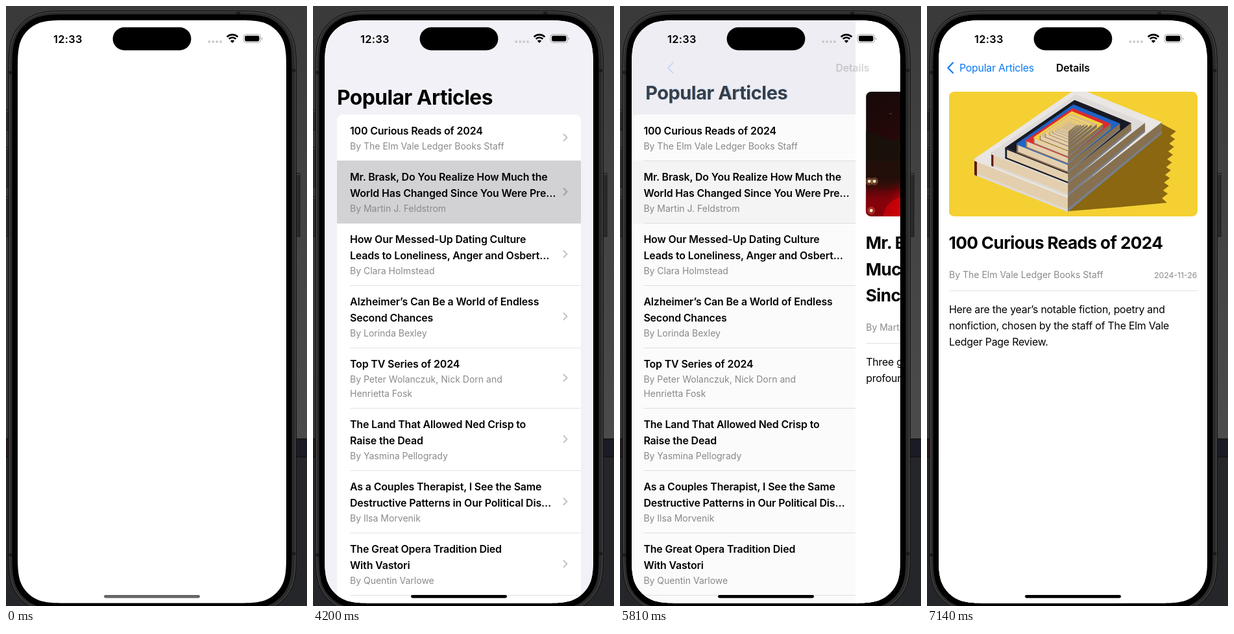
Recreate the animation shown at these times as an HTML page. Size 464x924 px, loop 8000 ms.

```html
<!DOCTYPE html>
<html lang="en">
<head>
<meta charset="utf-8">
<title>Popular Articles</title>
<style>
html, body { margin: 0; width: 100%; height: 100%; overflow: hidden; background: #2a2a2c; }
svg { display: block; width: 464px; height: 924px; }
text { font-family: Inter, "Liberation Sans", Arial, sans-serif; font-optical-sizing: none; white-space: pre; }
.large { font-size: 31.7px; font-weight: 700; letter-spacing: -.016em; }
.head { font-size: 26.2px; font-weight: 700; letter-spacing: -.024em; }
.row { font-size: 15.9px; font-weight: 600; letter-spacing: -.008em; }
.body { font-size: 15.9px; letter-spacing: -.015em; }
.by { font-size: 14px; fill: #8a8a8e; }
.date { font-size: 12.3px; fill: #8a8a8e; text-anchor: end; }
.clock { font-size: 16.4px; font-weight: 600; letter-spacing: .02em; }
.blue { fill: #0a7af5; }
</style>
</head>
<body>
<script>
const LOOP = 8000, TICK = 70, WIDTH = 414;

// ---- drawing helpers ----
const text = (cls, x, y, s) => `<text class="${cls}" x="${x}" y="${y}">${s}</text>`;
const rect = (x, y, w, h, fill, more = '') =>
  `<rect x="${x}" y="${y}" width="${w}" height="${h}" fill="${fill}" ${more}/>`;
const circle = (x, y, r, fill, more = '') => `<circle cx="${x}" cy="${y}" r="${r}" fill="${fill}" ${more}/>`;
const poly = (pts, fill, more = '') => `<polygon points="${pts.join(' ')}" fill="${fill}" ${more}/>`;
const group = (id, inner, more = '') => `<g id="${id}" ${more}>${inner}</g>`;
const range = n => [...Array(n).keys()];

// Rectangle with continuous-curvature corners
function smoothRect(x0, y0, x1, y1, r) {
  const curve = [[1.0885, 0], [.8684, 0], [.6315, .0749], [.3728, .1691], [.1691, .3728],
    [.0749, .6315], [0, .8684], [0, 1.0885], [0, 1.5287]];
  const corner = (cx, cy, sx, sy, swap) => {
    const at = ([a, b]) => {
      if (swap) [a, b] = [b, a];
      return (cx + sx * a * r).toFixed(2) + ' ' + (cy + sy * b * r).toFixed(2);
    };
    return 'L' + at([1.5287, 0]) + 'C' + curve.map(at).join(' ');
  };
  return ('M' + corner(x1, y0, -1, 1).slice(1) + corner(x1, y1, -1, -1, true) +
    corner(x0, y1, 1, -1) + corner(x0, y0, 1, 1, true) + 'Z');
}

// ---- content ----
const rows = [
  { top: 167, title: ['100 Curious Reads of 2024'], by: ['By The Elm Vale Ledger Books Staff'] },
  { top: 238, title: ['Mr. Brask, Do You Realize How Much the', 'World Has Changed Since You Were Pre…'], by: ['By Martin J. Feldstrom'] },
  { top: 334, title: ['How Our Messed-Up Dating Culture', 'Leads to Loneliness, Anger and Osbert…'], by: ['By Clara Holmstead'] },
  { top: 430, title: ['Alzheimer’s Can Be a World of Endless', 'Second Chances'], by: ['By Lorinda Bexley'] },
  { top: 526, title: ['Top TV Series of 2024'], by: ['By Peter Wolanczuk, Nick Dorn and', 'Henrietta Fosk'] },
  { top: 619, title: ['The Land That Allowed Ned Crisp to', 'Raise the Dead'], by: ['By Yasmina Pellogrady'] },
  { top: 715, title: ['As a Couples Therapist, I See the Same', 'Destructive Patterns in Our Political Dis…'], by: ['By Ilsa Morvenik'] },
  { top: 811, title: ['The Great Opera Tradition Died', 'With Vastori'], by: ['By Quentin Varlowe'] },
  { top: 907 }
];
const articles = [
  { head: ['100 Curious Reads of 2024'], by: rows[0].by[0], photo: booksPhoto,
    body: ['Here are the year’s notable fiction, poetry and', 'nonfiction, chosen by the staff of The Elm Vale', 'Ledger Page Review.'] },
  { head: ['Mr. Brask, Do You Realize How', 'Much the World Has Changed', 'Since You Were President?'], by: rows[1].by[0], photo: nightPhoto,
    body: ['Three giant, shifting tectonic plates will have', 'profound implications for the new administration.'] }
];

// ---- list page ----
const cardPath = 'M37 930V176.5a9.5 9.5 0 0 1 9.5-9.5h357a9.5 9.5 0 0 1 9.5 9.5V930Z';

function rowMarkup(row, i) {
  const next = rows[i + 1];
  if (!next) return '';
  const mid = (row.top + next.top) / 2;
  const byTop = row.top + 29 + 25 * row.title.length;
  return row.title.map((s, k) => text('row', 57, row.top + 30.5 + 25 * k, s)).join('') +
    row.by.map((s, k) => text('by', 57, byTop + 22 * k, s)).join('') +
    `<path d="M386.5 ${mid - 5}l5 5l-5 5" fill="none" stroke="#000" stroke-opacity=".24" stroke-width="2" stroke-linecap="round" stroke-linejoin="round"/>`;
}
function listMarkup() {
  const lines = rows.slice(1).map(r => rect(57, r.top, 356, 1, '#e2e2e5')).join('');
  const lit = [0, 1].map(i =>
    rect(37, rows[i].top, 376, rows[i + 1].top - rows[i].top + 1, '#d2d2d5', `id="lit${i}" clip-path="url(#card)"`)).join('');
  return rect(18, 22, WIDTH, 900, '#f2f1f7') + `<path d="${cardPath}" fill="#fff"/>` +
    lines + lit + rows.map(rowMarkup).join('');
}

// ---- detail page ----
function detailMarkup(a, i) {
  const base = 374 + 40.5 * (a.head.length - 1);
  return group('page' + i,
    `<g clip-path="url(#photo)"><g transform="translate(34 132)">${a.photo()}</g></g>` +
    a.head.map((s, k) => text('head', 33.5, 374 + 40.5 * k, s)).join('') +
    text('by', 34, base + 44.5, a.by) + text('date', 416.5, base + 44.5, '2024-11-26') +
    rect(34, base + 64, 383, 1, '#e2e2e5') +
    a.body.map((s, k) => text('body', 34, base + 98.5 + 25 * k, s)).join(''));
}

function nightPhoto() {
  const glow = (x, y, r, a, more = '') => circle(x, y, r, '#ea0509', `opacity="${a}" ${more}`);
  const blur = 'filter="url(#soft)"';
  const lamp = (x, y) => circle(x, y, 6, '#d9a070', 'opacity=".3"') + circle(x, y, 2.4, '#ffe9c4');
  const windows = range(22).map(k =>
    rect(36 + (k * 37 % 75), 33 + (k % 4) * 8, 4, 1.6, '#a98a3e', `opacity="${.35 + k % 3 * .2}"`)).join('');
  const columns = range(9).map(k => rect(132 + k * 11, 66, 4, 34, '#4c3b1c')).join('');
  return rect(0, 0, 383, 192, 'url(#night)') + windows +
    poly(['0,60', '40,75', '90,72', '130,90', '130,150', '0,150'], '#17120b', 'opacity=".8"') +
    rect(180.3, 0, 1.4, 48, '#b5a288') + poly(['155,53', '181,47', '207,53'], '#6d5c34') +
    rect(127, 57, 98, 48, '#a8924c') + rect(126, 55, 100, 3, '#cdb877') + columns +
    rect(124, 102, 106, 4, '#d8c174') + rect(0, 107, 383, 40, '#25100a', 'opacity=".8"') +
    poly(['90,192', '190,140', '226,84', '270,62', '383,-10', '383,115', '300,152', '260,200'], '#e00509', 'opacity=".8" ' + blur) +
    rect(-20, 152, 420, 60, '#b5060a', 'opacity=".65" ' + blur) +
    glow(100, 185, 52, .9, blur) + glow(100, 192, 50, .75) + glow(60, 196, 34, .5) +
    glow(215, 142, 28, .4) + glow(245, 95, 34, .3) + glow(250, 130, 38, .35) +
    glow(315, 77, 33, .95) + glow(260, 72, 24, .4) +
    poly(['184,117', '188,140', '180,140'], '#fff0dc') + rect(260, 40, 18, 4, '#d9a5a5') +
    [[5, 138], [13, 138], [331, 127], [372, 135], [376, 149], [63, 152], [8, 183], [373, 182]].map(p => lamp(...p)).join('');
}

function booksPhoto() {
  const covers = ['#e9e6e3', '#dedbd8', '#171a24', '#1f63c8', '#dc2a30', '#f3d23a'];
  const teeth = range(9).flatMap(k => [`${350 - k * 1.6},${61 + k * 12}`, `${341 - k * 1.6},${68 + k * 12}`]);
  const layers = range(13).map(k => {
    const f = .82 ** k, h = 25 * f;
    const at = (x, y, down = 0) => `${(184 + x * f).toFixed(1)},${(51 + y * f + down).toFixed(1)}`;
    const L = d => at(-145, 52, d), T = at(14, -57), R = d => at(144, -4, d), B = d => at(-1, 109, d);
    const cover = covers[k] || (k % 2 ? '#f0d567' : '#d9bd8c');
    const edge = k === 2 ? '#171a24' : '#8a6a50';
    return poly([L(0), B(0), B(h), L(h)], '#e3cfae') + poly([B(0), R(0), R(h * .7), B(h)], '#86704f') +
      poly([B(h * .8), R(h * .55), R(h * .7), B(h)], '#77808f') +
      poly([L(h * .86), B(h * .86), B(h), L(h)], k < 2 ? '#dedad4' : edge) +
      poly([L(0), L(h), at(-141, 54, h), at(-141, 54)], k < 2 ? '#5e1c16' : edge) +
      poly([L(0), T, R(0), B(0)], cover) +
      poly([L(0), B(0), B(h * .14), L(h * .14)], cover);
  }).join('');
  return rect(0, 0, 383, 192, '#f5d033') +
    poly(['183,184', '240,100', '310,40', ...teeth, '336,171', '260,178'], '#8a6710') + layers;
}

// ---- status bar, spinner, frame ----
function statusMarkup() {
  const arc = r => {
    const d = r * .707;
    return `<path d="M${349 - d} ${56 - d}A${r} ${r} 0 0 1 ${349 + d} ${56 - d}" fill="none" stroke="#000" stroke-width="2.7"/>`;
  };
  return text('clock', 73, 57, '12:33') + rect(164.6, 32.8, 120.8, 35.4, '#000', 'rx="17.7"') +
    range(4).map(k => circle(313.3 + k * 5.9, 55, 1.9, '#c9c9cb')).join('') +
    arc(11.8) + arc(7.5) + '<path d="M349 57l-3.2-3.3a4.6 4.6 0 0 1 6.4 0Z"/>' +
    rect(366, 43.8, 26.5, 12.6, 'none', 'rx="4" stroke="#a3a3a3"') +
    rect(368, 45.7, 22.5, 8.8, '#000', 'rx="2.4"') +
    '<path d="M394 48.2a2.2 2.2 0 0 1 0 4Z" fill="#a3a3a3"/>';
}
const spinnerMarkup = () => range(8).map(k =>
  rect(-1.2, -9.6, 2.4, 5.6, '#3c3c43', `class="spoke" rx="1.2" transform="rotate(${k * 45})"`)).join('');

function frameMarkup() {
  const button = (x, y, h) => rect(x, y, 6, h, '#2b2b2b', 'stroke="#161616"') + rect(x, y + 1, 6, 1, '#555');
  const notch = (x, y) => rect(x, y, 5, 5, '#1b1b1b');
  return rect(0, 0, 464, 924, 'url(#wall)') + rect(400, 0, 64, 667, 'url(#wallRight)') +
    rect(0, 667, 232, 28, '#251b1c') + rect(232, 667, 232, 28, '#1b1b26') +
    rect(0, 695, 464, 229, '#25262a') + rect(0, 666, 464, 1, '#0c0c0c') + rect(0, 694, 464, 1, '#0c0c0c') +
    button(-2, 160, 31) + button(-2, 218, 61) + button(-2, 294, 61) + button(447, 258, 97) +
    `<path d="${smoothRect(4, 7.5, 447.5, 934, 67)}" fill="#2a2a2a" stroke="#111"/>` +
    `<path d="${smoothRect(5.5, 9, 446, 932.5, 65.5)}" fill="none" stroke="#4c4c4c"/>` +
    notch(5, 100) + notch(441, 97) + notch(5, 843) + notch(441, 841) + rect(355, 9, 6, 4, '#1b1b1b') +
    `<path d="${smoothRect(9.5, 13, 440.5, 928.5, 61)}" fill="#000"/>`;
}

const linear = (id, a, b, more = '') =>
  `<linearGradient id="${id}" ${more}><stop stop-color="${a}"/><stop offset="1" stop-color="${b}"/></linearGradient>`;

document.body.innerHTML = `<svg viewBox="0 0 464 924">
<defs>
  ${linear('wall', '#3a3a3a', '#343434', 'x2="0" y2="1"')}
  ${linear('wallRight', '#3b3b3b', '#4b4b4b', 'x2="0" y2="1"')}
  ${linear('night', '#150909', '#5a0608', 'x2="1" y2=".6"')}
  <clipPath id="screen"><path d="${smoothRect(18, 22, 432, 919.5, 53)}"/></clipPath>
  <clipPath id="card"><path d="${cardPath}"/></clipPath>
  <clipPath id="photo">${rect(33.5, 132, 383.5, 192, '#000', 'rx="8.5"')}</clipPath>
  <filter id="soft" x="-30%" y="-40%" width="160%" height="180%"><feGaussianBlur stdDeviation="11"/></filter>
</defs>
${frameMarkup()}
<g clip-path="url(#screen)">
  ${rect(18, 22, WIDTH, 900, '#fff')}
  ${group('spinner', spinnerMarkup(), 'transform="translate(225 504)"')}
  ${group('home',
    group('list', listMarkup()) + rect(18, 22, WIDTH, 900, '#000', 'id="dim"') +
    group('detail', rect(18, 22, WIDTH, 900, '#fff') + articles.map(detailMarkup).join('')) +
    group('large', text('large', 0, 0, 'Popular Articles')) +
    group('label', text('body blue', 0, 0, 'Popular Articles')) +
    group('chevron', '<path d="M40 87.3l-7.7 7.9l7.7 7.9" fill="none" stroke="#0a7af5" stroke-width="2.1" stroke-linecap="round" stroke-linejoin="round"/>') +
    group('navTitle', text('row', 199, 101, 'Details')))}
  ${statusMarkup()}
  ${rect(151, 906.9, 148, 4.8, '#000', 'id="bar" rx="2.4"')}
</g></svg>`;

// ---- motion ----
const el = {};
document.querySelectorAll('svg [id]').forEach(n => el[n.id] = n);
const spokes = [...document.querySelectorAll('.spoke')];
const clamp = v => Math.max(0, Math.min(1, v));
const mix = (a, b, k) => a + (b - a) * k;
const fade = (n, v) => n.setAttribute('opacity', clamp(v).toFixed(3));
const move = (n, x, y = 0, scale = 1) => n.setAttribute('transform', `translate(${x} ${y}) scale(${scale})`);

// Critically damped spring: 1 at the start, 0 at rest
function spring(ms) {
  if (ms <= 0) return 1;
  if (ms >= 530) return 0;
  const w = .018 * ms;
  return (1 + w) * Math.exp(-w);
}
const PUSH_A = 4205, POP = 5630, PUSH_B = 6585;

function render(t) {
  // away: 1 = list showing, 0 = detail showing
  const away = t >= 6580 ? spring(t - PUSH_B) : t >= POP ? 1 - spring(t - POP) : spring(t - PUSH_A);
  const shown = 1 - away;

  fade(el.bar, mix(.6, 1, clamp(t / 560)));
  fade(el.spinner, t < 1120 ? (t - 70) / 280 : 0);
  const u = (t + 630) / 210, turn = Math.floor(u) + Math.min(1, (u % 1) * 1.5);
  spokes.forEach((s, k) => fade(s, .16 + .44 * (1 - ((turn - k) % 8 + 8) % 8 / 8)));

  fade(el.home, (t - 1050) / 210);
  move(el.list, -.3 * WIDTH * shown);
  fade(el.dim, .1 * shown);
  move(el.detail, WIDTH * away);
  fade(el.page1, t < 6580 ? 1 : 0);
  fade(el.page0, t < 6580 ? 0 : 1);
  fade(el.lit1, t >= 4200 && t < 6160 ? (t < POP ? 1 : spring(t - POP)) : 0);
  fade(el.lit0, t >= 6580 ? 1 : 0);

  const x = mix(50, 37, away), y = mix(101, 152, away);
  const pressed = t >= 5460 && t < 5670;
  move(el.large, x, y, mix(.475, 1, away));
  fade(el.large, 1 - 1.5 * shown);
  move(el.label, x, y, mix(1, 2.1, away));
  fade(el.label, pressed ? .2 * shown : shown);
  move(el.chevron, 50 * away);
  fade(el.chevron, pressed ? .45 * shown : shown);
  move(el.navTitle, 160 * away);
  fade(el.navTitle, shown);
}

const start = performance.now();
function tick() {
  const t = (performance.now() - start) % LOOP;
  render(Math.floor(t / TICK) * TICK);
  requestAnimationFrame(tick);
}
tick();
</script>
</body>
</html>
```
